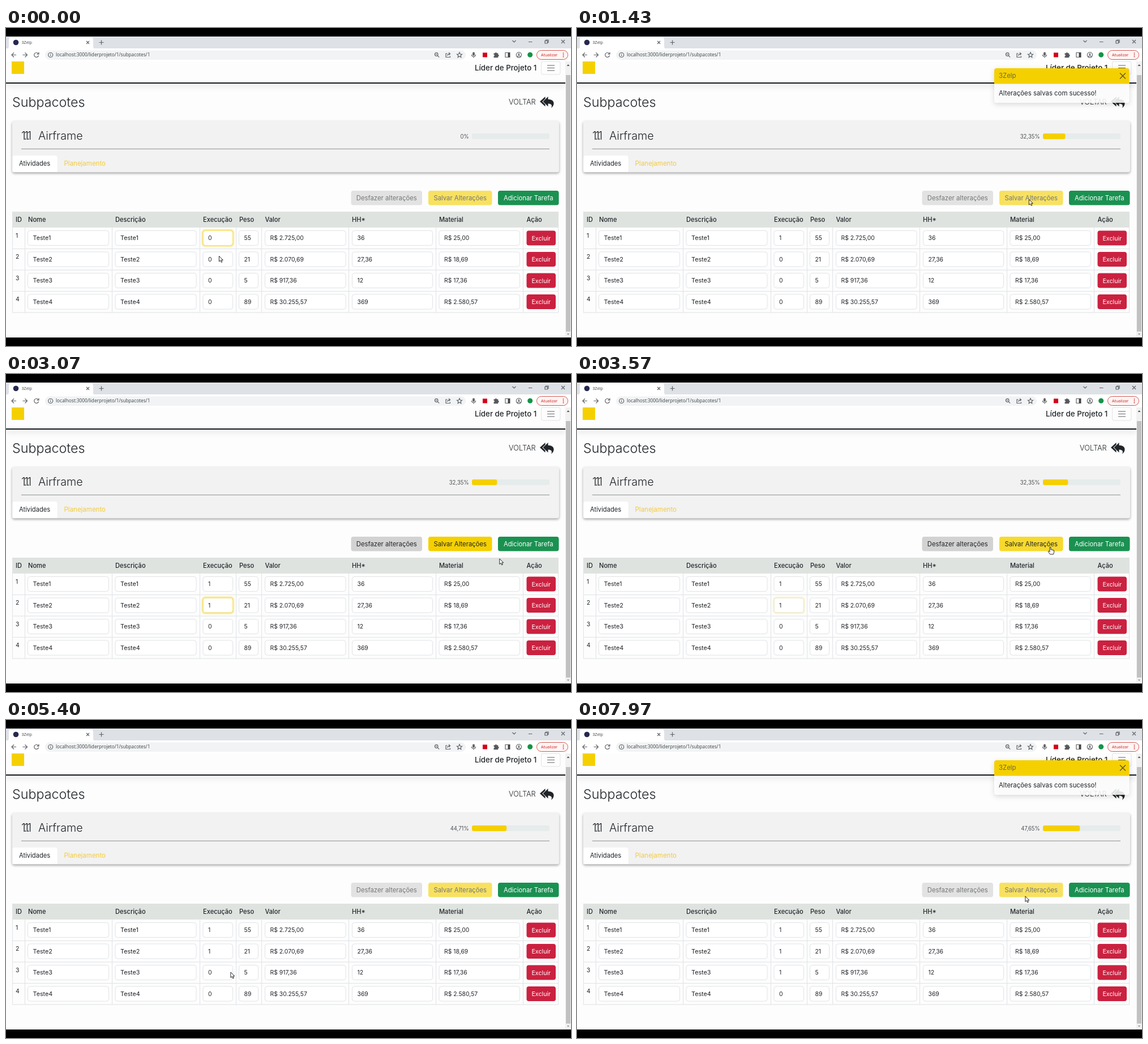
Animation, 998 px wide and 561 px high, one loop 8 s. Source, as an HTML page:

```html
<!DOCTYPE html>
<html lang="pt-BR">
<head>
<meta charset="utf-8">
<title>Subpacotes</title>
<style>
html, body { margin: 0; width: 100%; height: 100%; overflow: hidden; background: #000; }
svg { display: block; width: 100%; height: 100%; font-family: Inter, "Open Sans", sans-serif; }
.ui { font-family: "Open Sans", "Noto Sans", sans-serif; }
.line { fill: none; stroke: #5f6368; stroke-width: 1.2; }
.card { filter: drop-shadow(0 2px 2px rgba(0,0,0,.36)); }
.toast { filter: drop-shadow(0 3px 5px rgba(0,0,0,.16)); }
.bar { filter: drop-shadow(0 4px 5px rgba(0,0,0,.22)); }
text { white-space: pre; }
</style>
</head>
<body>
<svg id="stage" viewBox="0 0 998 561"></svg>
<script>
const NS = 'http://www.w3.org/2000/svg';
const stage = document.getElementById('stage');
const INK = '#212529', YELLOW = '#f5d000', BRAND = '3Zelp', LOOP = 8000;

function el(tag, attrs, parent = stage) {
  const node = document.createElementNS(NS, tag);
  for (const k in attrs) node.setAttribute(k, attrs[k]);
  return parent.appendChild(node);
}
const rect = (x, y, width, height, fill, more = {}, parent) =>
  el('rect', { x, y, width, height, fill, ...more }, parent);
const path = (d, more, parent) => el('path', { d, ...more }, parent);
const circle = (cx, cy, r, fill, parent) => el('circle', { cx, cy, r, fill }, parent);
function text(x, y, size, str, more = {}, parent) {
  const node = el('text', { x, y, 'font-size': size, fill: INK, ...more }, parent);
  node.textContent = str;
  return node;
}
const line = (d, more = {}) => path(d, { class: 'line', ...more });

// Browser window
function drawBrowser() {
  rect(0, 15, 998, 22, '#dee1e6');
  rect(0, 36, 998, 23, '#fff');
  path('M1 37 Q5 37 5 32 V21 Q5 16 10 16 H149 Q154 16 154 21 V32 Q154 37 158 37 Z', { fill: '#fff' });
  circle(17.5, 25.5, 4.8, '#252850');
  const ui = { class: 'ui', fill: '#3c4043' };
  text(27.5, 28.3, 7.2, BRAND, ui);
  line('M142 23 l5 5 m0 -5 l-5 5 M164.5 25.5 h8 m-4 -4 v8', { stroke: '#3c4043' });
  line('M894.5 22 l3 3 3 -3 M923 24.5 h6.5 M981 21 l6 6 m0 -6 l-6 6', { stroke: '#222', 'stroke-width': 1 });
  line('M952 22.5 h4.5 v4.5 h-4.5 z M953.5 22.5 v-1.5 h4.5 v4.5 h-1.5', { stroke: '#222', 'stroke-width': .9 });

  line('M18 47.5 h-8 m4 -4 l-4 4 4 4', { stroke: '#444' });
  line('M29.5 47.5 h8 m-4 -4 l4 4 -4 4', { stroke: '#b5b8bc' });
  line('M57 45.2 A4 4 0 1 0 57.6 48.5 M58 42.8 v3.4 h-3.4', { stroke: '#444' });
  rect(69, 39.5, 743, 16.5, '#f1f3f4', { rx: 8.2 });
  line('M82.7 47.5 a4 4 0 1 1 -8 0 a4 4 0 1 1 8 0 M78.7 47 v2.6 M78.7 45 v1', { 'stroke-width': 1 });
  text(88, 50.4, 8.25, 'localhost:3000/liderprojeto/1/subpacotes/1', ui);
  line('M763 46.5 a2.8 2.8 0 1 1 -5.6 0 a2.8 2.8 0 1 1 5.6 0 M762.4 48.8 l2.8 2.8 M758.9 46.5 h2.6');
  line('M779.5 45 h-2.5 v6.5 h7.5 v-2 M779.5 49 q.5 -3.5 4.5 -3.5 m-2 -2.3 l2.6 2.3 -2.6 2.3', { 'stroke-width': 1 });
  line('M801 43 l1.3 3 3.2 .3 -2.4 2.2 .7 3.2 -2.8 -1.7 -2.8 1.7 .7 -3.2 -2.4 -2.2 3.2 -.3 z', { 'stroke-width': 1 });
  rect(824, 42.5, 4, 6.5, '#666', { rx: 2 });
  line('M822.5 47 q0 3.5 3.5 3.5 t3.5 -3.5 M826 50.5 v2', { 'stroke-width': 1 });
  rect(842, 43.5, 8, 8, '#d4001a');
  path('M861.5 44.5 h2.4 a1.5 1.5 0 1 1 3 0 h2.4 v2.5 a1.5 1.5 0 1 1 0 3 v2.3 h-7.8 v-2.6 a1.4 1.4 0 0 0 0 -2.8 z', { fill: '#55585c' });
  line('M882 43.5 h8 v8 h-8 z', { stroke: '#444' });
  rect(886.5, 43.5, 3.5, 8, '#444');
  line('M910.5 47.5 a4.6 4.6 0 1 1 -9.2 0 a4.6 4.6 0 1 1 9.2 0 M903 50.5 q3 -2.6 6 0', { 'stroke-width': 1 });
  circle(905.9, 46.2, 1.5, '#5f6368');
  circle(925.7, 47.3, 4.5, '#139447');
  rect(937.5, 39.5, 55, 16, '#fff6f5', { rx: 8, stroke: '#d7564d' });
  text(945, 50.1, 7.1, 'Atualizar', { class: 'ui', fill: '#c5221f' });
  for (const y of [44.3, 47.5, 50.7]) circle(984.5, y, .9, '#c5221f');
}

// Page frame: navigation bar, heading, card, scrollbar
function drawPage() {
  rect(0, 59, 988, 487, '#fdfdfd');
  rect(0, 95.8, 988, 2.4, '#20252a', { class: 'bar' });
  rect(0, 59, 988, 37, '#fdfdfd');
  rect(10, 59, 22, 22, YELLOW);
  text(828, 75, 13.3, 'Líder de Projeto 1', { 'font-weight': 500 });
  rect(945.5, 59, 33.5, 23, '#fdfdfd', { rx: 3, stroke: '#e3e3e3' });
  line('M956 66 h13 m-13 4.5 h13 m-13 4.5 h13', { stroke: '#555' });

  text(11, 139, 23.3, 'Subpacotes', { 'font-weight': 300 });
  text(888, 135.3, 12.8, 'VOLTAR', { 'font-weight': 300 });
  path('M952.5 121 L943 129.7 952.5 138.5 V134.8 L947.3 129.7 952.5 124.7 Z', { fill: INK });
  path('M957.5 121 L948.5 129.7 957.5 138.5 V133.6 C963 133.6 965.2 135.5 963.2 141 C970 136 969.5 126 957.5 125.8 Z', { fill: INK });

  rect(11, 164, 966, 90.5, '#f2f2f2', { rx: 4, class: 'card' });
  const num = text(27, 197, 19.4, '1.1.1', { 'font-weight': 300 });
  num.setAttribute('letter-spacing', '-.16em');
  text(57, 197, 19.7, 'Airframe', { 'font-weight': 300 });
  rect(27, 212.8, 933, 1, '#8d8f90');
  path('M11.5 254 V229 Q11.5 225 15.5 225 H86.5 Q90.5 225 90.5 229 V254 Z', { fill: '#fff' });
  text(23, 243.2, 11.2, 'Atividades');
  text(102.5, 243.2, 11.5, 'Planejamento', { fill: '#f3cb3b' });
  rect(823, 186, 137, 10, '#e6ebeb', { rx: 3 });

  rect(988, 59, 10, 487, '#f1f1f1');
  rect(989, 83, 8, 452.5, '#c1c1c1');
  path('M990.5 67 h5 l-2.5 -3 z', { fill: '#555' });
  path('M991 539 h4 l-2 2.5 z', { fill: '#888' });
}

function button(x, y, w, h, fill, label, size, color) {
  const g = el('g', {});
  const box = rect(x, y, w, h, fill, { rx: 4 }, g);
  text(x + w / 2, y + h / 2 + 4, size, label, { fill: color, 'text-anchor': 'middle' }, g);
  return { g, box };
}

const rowTop = i => 352 + 37.5 * i;
const execCells = [], rings = [];

function drawTable() {
  rect(11, 324, 965, 28, '#dfe3e0');
  const heads = [[17, 'ID'], [39, 'Nome'], [193, 'Descrição'], [348, 'Execução'], [412, 'Peso'],
    [457.5, 'Valor'], [611, 'HH*'], [765, 'Material'], [919.5, 'Ação']];
  for (const [x, s] of heads) text(x, 342, 11.1, s, { 'font-weight': 500 });
  for (const x of [11, 33, 187, 342, 406, 451, 605, 759, 913, 975])
    rect(x, 352, 1, 150, '#e0e3e6');

  const fields = [[38.5, 143], [193, 143], [348, 52.5], [411.5, 34], [457.5, 142.5], [611.5, 142], [765, 142.5]];
  const rows = [
    ['55', 'R$ 2.725,00', '36', 'R$ 25,00'],
    ['21', 'R$ 2.070,69', '27,36', 'R$ 18,69'],
    ['5', 'R$ 917,36', '12', 'R$ 17,36'],
    ['89', 'R$ 30.255,57', '369', 'R$ 2.580,57']
  ];
  rows.forEach((row, i) => {
    const y = rowTop(i), name = 'Teste' + (i + 1);
    rect(11, y + 37, 965, 1, '#dee2e6');
    text(17, y + 17.7, 10.4, i + 1);
    const values = [name, name, '0', ...row];
    fields.forEach(([x, w], c) => {
      rect(x, y + 5.5, w, 26, '#fff', { rx: 4, stroke: '#e0e3e7' });
      if (c === 2) {
        const g = el('g', {});
        rect(x - 1.2, y + 4.3, w + 2.4, 28.4, 'none',
          { rx: 5, stroke: YELLOW, 'stroke-opacity': .36, 'stroke-width': 3 }, g);
        rect(x, y + 5.5, w, 26, 'none', { rx: 4, stroke: '#f7df6c' }, g);
        rings.push(g);
      }
      const t = text(x + 9, y + 22.2, c < 2 ? 10.8 : 10.4, values[c]);
      if (c === 2) execCells.push(t);
    });
    button(919.5, y + 5.5, 51.5, 26, '#cb2140', 'Excluir', 10.7, '#fff');
  });
}

drawBrowser();
drawPage();
const fill = rect(823, 186, 0, 10, YELLOW, { rx: 3 });
const percent = text(817.5, 194.7, 9.7, '', { 'text-anchor': 'end', 'font-weight': 300 });
const undo = button(609.5, 287, 125.5, 25.5, '#d2d2d2', 'Desfazer alterações', 11.3, INK);
const save = button(746, 287, 112.5, 25.5, YELLOW, 'Salvar Alterações', 11.3, INK);
const glow = rect(746, 287, 112.5, 25.5, '#fff', { rx: 4, opacity: 0 }, save.g);
save.box.after(glow);
button(869, 287, 107.5, 25.5, '#1a9151', 'Adicionar Tarefa', 11.3, '#fff');
drawTable();

const toast = el('g', { class: 'toast' });
rect(737, 71, 238.5, 61, '#fff', { rx: 4, opacity: .87 }, toast);
path('M737 98.5 V75 Q737 71 741 71 H971.5 Q975.5 71 975.5 75 V98.5 Z', { fill: YELLOW }, toast);
text(745, 88.3, 11.4, BRAND, { fill: '#6c6a45' }, toast);
path('M959 79.5 l10 10 m0 -10 l-10 10', { fill: 'none', stroke: '#5b5220', 'stroke-width': 1.4 }, toast);
text(745, 119.2, 11.4, 'Alterações salvas com sucesso!', {}, toast);

const cursor = el('g', {});
const pen = { fill: '#fff', stroke: '#111', 'stroke-width': .9, 'stroke-linejoin': 'round' };
const arrow = path('M.4 .4 V10 L2.7 8 4.3 11.4 5.9 10.7 4.4 7.4 H7.3 Z', pen, cursor);
const hand = path('M-1 .8 Q0 -.6 1 .8 V5 Q2.2 4.3 3 5.4 Q4.3 4.7 5 5.9 Q6.6 5.4 6.6 7 V9.5 L5.5 13 H-.5 L-3.6 8.6 Q-4 7 -2.5 7.3 L-1 8.8 Z', pen, cursor);

// Timeline in ms
const typed = [330, 2250, 6350];
const focused = [[-500, 1000], [1950, 3470], [6000, 7300]];
const dirty = [[330, 1060], [2250, 3620], [6350, 7370]];
const hover = [[850, 1060], [3150, 3620], [7120, 7370]];
const handTimes = [...hover.slice(0, 2), [2540, 2700], [7090, 7370]];
const toasts = [[1090, 2250], [3670, 4830], [7420, 9000]];
const progress = [[1070, 32.35], [3650, 44.71], [7400, 47.65]];
const moves = [
  [0, 376, 402], [350, 384, 404], [900, 799, 303], [1450, 798, 302], [2000, 365, 406],
  [2270, 368, 406], [2600, 923, 410], [2850, 905, 345], [3300, 836, 305], [3750, 836, 305],
  [4500, 425, 430], [5020, 396.5, 444.5], [5850, 396.5, 444.5], [6080, 372, 445],
  [6420, 374, 445], [7130, 795.5, 311], [7300, 791.5, 310.5], [8000, 791.5, 310.5]
];

const clamp = v => Math.max(0, Math.min(1, v));
const within = (spans, t) => spans.some(([a, b]) => t >= a && t < b);
const fade = (spans, t) =>
  spans.reduce((sum, [a, b]) => sum + clamp((t - a) / 150) - clamp((t - b) / 150), 0);

function cursorAt(t) {
  const i = moves.findIndex(m => m[0] > t);
  const [t0, x0, y0] = moves[i - 1], [t1, x1, y1] = moves[i];
  const p = (t - t0) / (t1 - t0), e = p * p * (3 - 2 * p);
  return [x0 + (x1 - x0) * e, y0 + (y1 - y0) * e];
}

function render(t) {
  typed.forEach((at, i) => { execCells[i].textContent = t >= at ? '1' : '0'; });
  rings.forEach((r, i) => r.setAttribute('opacity', focused[i] ? fade([focused[i]], t) : 0));

  const active = .62 + .38 * fade(dirty, t);
  undo.g.setAttribute('opacity', active);
  save.g.setAttribute('opacity', active);
  glow.setAttribute('opacity', .18 * fade(hover, t));
  toast.setAttribute('opacity', fade(toasts, t));

  let width = 0, value = 0;
  for (const [at, next] of progress) {
    if (t < at) break;
    width = value + (next - value) * (1 - (1 - clamp((t - at) / 600)) ** 2.4);
    value = next;
  }
  fill.setAttribute('width', 1.37 * width);
  percent.textContent = String(value).replace('.', ',') + '%';

  const pointing = within(handTimes, t);
  arrow.setAttribute('visibility', pointing ? 'hidden' : 'visible');
  hand.setAttribute('visibility', pointing ? 'visible' : 'hidden');
  cursor.setAttribute('transform', `translate(${cursorAt(t)})`);
}

const start = performance.now();
function tick() {
  render((performance.now() - start) % LOOP);
  requestAnimationFrame(tick);
}
tick();
</script>
</body>
</html>
```
